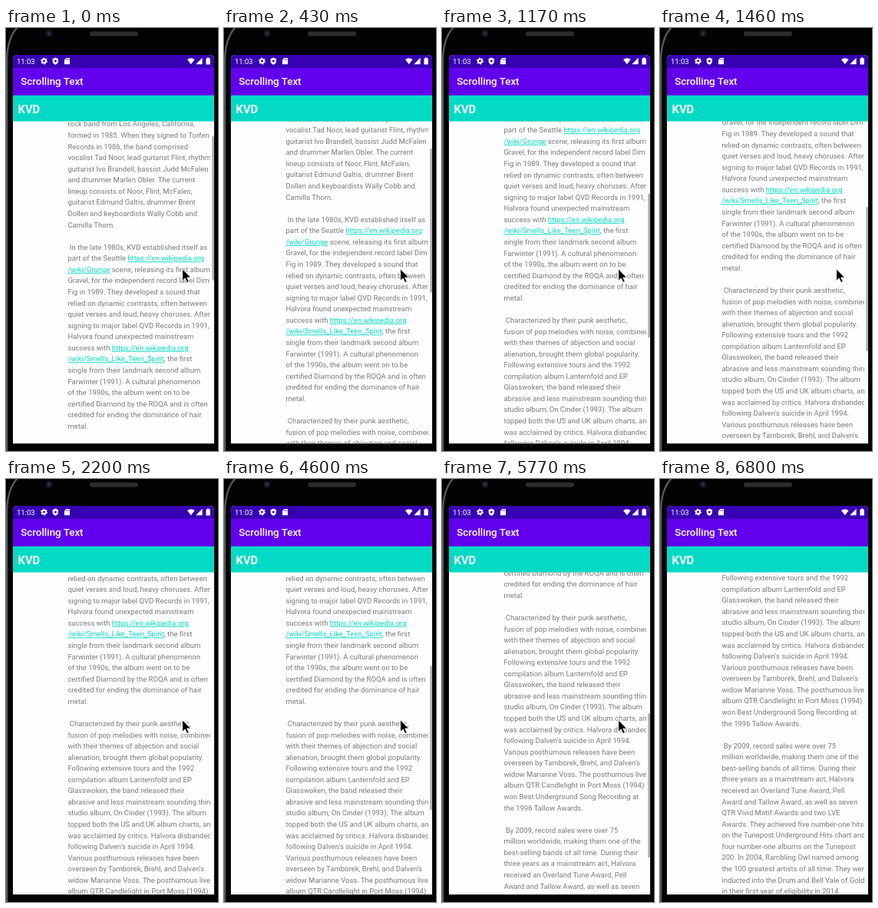
Recreate the animation shown at these times as an HTML page. Size 276 by 551 pixels, loop 7380 ms.

```html
<!DOCTYPE html>
<html lang="en">
<head>
<meta charset="utf-8">
<title>Scrolling Text</title>
<style>
  html, body { margin: 0; height: 100%; overflow: hidden; background: #000; }
  svg { display: block; width: 100vw; height: 100vh; font-family: Roboto, sans-serif; }
  #copy { font-size: 9.5px; fill: #7a7a7a; }
  .link { fill: #03dac5; text-decoration: underline; }
</style>
</head>
<body>
<svg viewBox="0 0 276 551">
  <defs>
    <clipPath id="screen"><path d="M9 541.5V41Q9 35 15 35H265Q271 35 271 41V541.5Z"/></clipPath>
    <clipPath id="page"><rect x="80" y="121.6" width="186" height="419.9"/></clipPath>
  </defs>

  <!-- phone body -->
  <rect width="276" height="551"/>
  <path d="M1.2 560V40Q2 10 18 -4H290V560Z" fill="#030304" stroke="#55585c" stroke-width="2.4"/>
  <circle cx="56" cy="7" r="4.5" fill="#15181f"/>
  <circle cx="56" cy="7" r="2" fill="#27324a"/>
  <rect x="109" y="4.5" width="63" height="6" rx="3" fill="#2b2c2e"/>

  <!-- screen -->
  <g clip-path="url(#screen)">
    <rect x="9" y="35" width="262" height="506.5" fill="#fefefe"/>
    <rect x="9" y="35" width="262" height="17" fill="#3700b3"/>
    <rect x="9" y="52" width="262" height="36" fill="#6200ee"/>
    <rect x="9" y="87.7" width="262" height="33.9" fill="#03dac5"/>
  </g>

  <g fill="#fff">
    <text x="14" y="46.5" font-size="9.5">11:03</text>
    <circle cx="49.5" cy="43" r="2.4" fill="none" stroke="#fff" stroke-width="1.9"/>
    <circle cx="49.5" cy="43" r="3.8" fill="none" stroke="#fff" stroke-width="1.3" stroke-dasharray="2 1.98"/>
    <path d="M64.3 38.6L68 40.2V43Q68 46.4 64.3 47.8Q60.6 46.4 60.6 43V40.2Z"/>
    <circle cx="64.3" cy="43" r="1.5" fill="#3700b3"/>
    <path d="M78.4 39H83V47.3H76V41.4Z"/>
    <path d="M78.8 40.3v1.6M80.3 40.3v1.6M81.8 40.3v1.6" stroke="#3700b3" stroke-width=".7"/>
    <path d="M236 41Q240.8 37.4 245.6 41L240.8 47.3Z"/>
    <path d="M255.6 38.8V47.3H247.2Z"/>
    <path d="M262 38.6H264.2V39.5H265.8V47.4H260.4V39.5H262Z"/>
    <text x="19.2" y="74.2" font-size="13.4" font-weight="500">Scrolling Text</text>
    <text x="15.5" y="110.6" font-size="14.8" font-weight="700">KVD</text>
  </g>

  <g clip-path="url(#page)"><g id="copy"></g></g>
  <rect id="bar" x="268.2" width="2.8" height="187.5" fill="#b0b0b0"/>
  <path id="cursor" d="M0 0V15.2L3.5 12L6 17.5L8.5 16.4L6 11H10.8Z" stroke="#fff" stroke-width=".8"/>
</svg>

<script>
const LOOP = 7380, RESUME = 4600, TICK = 146.6, LEADING = 14.57;

const copyText = `rock band from Los Angeles, California,
formed in 1985. When they signed to Torfen
Records in 1986, the band comprised
vocalist Tad Noor, lead guitarist Flint, rhythm
guitarist Ivo Brandell, bassist Judd McFalen
and drummer Marlen Obler. The current
lineup consists of Noor, Flint, McFalen,
guitarist Edmund Galtis, drummer Brent
Dollen and keyboardists Wally Cobb and
Camilla Thorn.

 In the late 1980s, KVD established itself as
part of the Seattle https://en.wikipedia.org
/wiki/Grunge scene, releasing its first album
Gravel, for the independent record label Dim
Fig in 1989. They developed a sound that
relied on dynamic contrasts, often between
quiet verses and loud, heavy choruses. After
signing to major label QVD Records in 1991,
Halvora found unexpected mainstream
success with https://en.wikipedia.org
/wiki/Smells_Like_Teen_Spirit, the first
single from their landmark second album
Farwinter (1991). A cultural phenomenon
of the 1990s, the album went on to be
certified Diamond by the ROQA and is often
credited for ending the dominance of hair
metal.

 Characterized by their punk aesthetic,
fusion of pop melodies with noise, combined
with their themes of abjection and social
alienation, brought them global popularity.
Following extensive tours and the 1992
compilation album Lanternfold and EP
Glasswoken, the band released their
abrasive and less mainstream sounding third
studio album, On Cinder (1993). The album
topped both the US and UK album charts, and
was acclaimed by critics. Halvora disbanded
following Dalven's suicide in April 1994.
Various posthumous releases have been
overseen by Tamborek, Brehl, and Dalven's
widow Marianne Voss. The posthumous live
album QTR Candlelight in Port Moss (1994)
won Best Underground Song Recording at
the 1996 Tallow Awards.

 By 2009, record sales were over 75
million worldwide, making them one of the
best-selling bands of all time. During their
three years as a mainstream act, Halvora
received an Overland Tune Award, Pell
Award and Tallow Award, as well as seven
QTR Vivid Motif Awards and two LVE
Awards. They achieved five number-one hits
on the Tunepost Underground Hits chart and
four number-one albums on the Tunepost
200. In 2004, Rambling Owl named among
the 100 greatest artists of all time. They were
inducted into the Drum and Bell Vale of Gold
in their first year of eligibility in 2014.`;

const $ = id => document.getElementById(id);
const link = /(https:\S+|\/wiki\/\w+)/g;

$('copy').innerHTML = copyText.split('\n').map((line, i) => {
  const body = line.replace(/^ /, '\u00a0').replace(link, '<tspan class="link">$1</tspan>');
  return `<text x="80.4" y="${(128.4 + i * LEADING).toFixed(2)}">${body}</text>`;
}).join('');

// Scroll offset per tick for the two bursts; the last value holds.
const bursts = [
  [0, 14, 36, 58, 79, 100, 121, 144, 167, 188, 206, 220, 229],
  [229, 231, 231, 231, 253, 282, 311, 340, 367, 412, 455, 477]
];
const cursorPath = { 9: [150, 318], 10: [31, 317], 11: [38, 315] };

function draw(t) {
  const second = t >= RESUME;
  const tick = Math.floor((t - (second ? RESUME : 0) + 7) / TICK);
  const stops = bursts[+second];
  const y = stops[Math.min(tick, stops.length - 1)];

  $('copy').setAttribute('transform', `translate(0 ${-y})`);
  $('bar').setAttribute('y', 141 + y * 0.448);
  $('bar').setAttribute('opacity', tick < 14 ? 1 : tick === 14 ? 0.5 : 0);

  const [cx, cy] = second && cursorPath[tick] || [229.7, 314];
  $('cursor').setAttribute('transform', `translate(${cx} ${cy})`);
  $('cursor').setAttribute('opacity', second && tick > 11 ? 0 : 1);
}

function frame() {
  draw(performance.now() % LOOP);
  requestAnimationFrame(frame);
}
frame();
</script>
</body>
</html>
```
